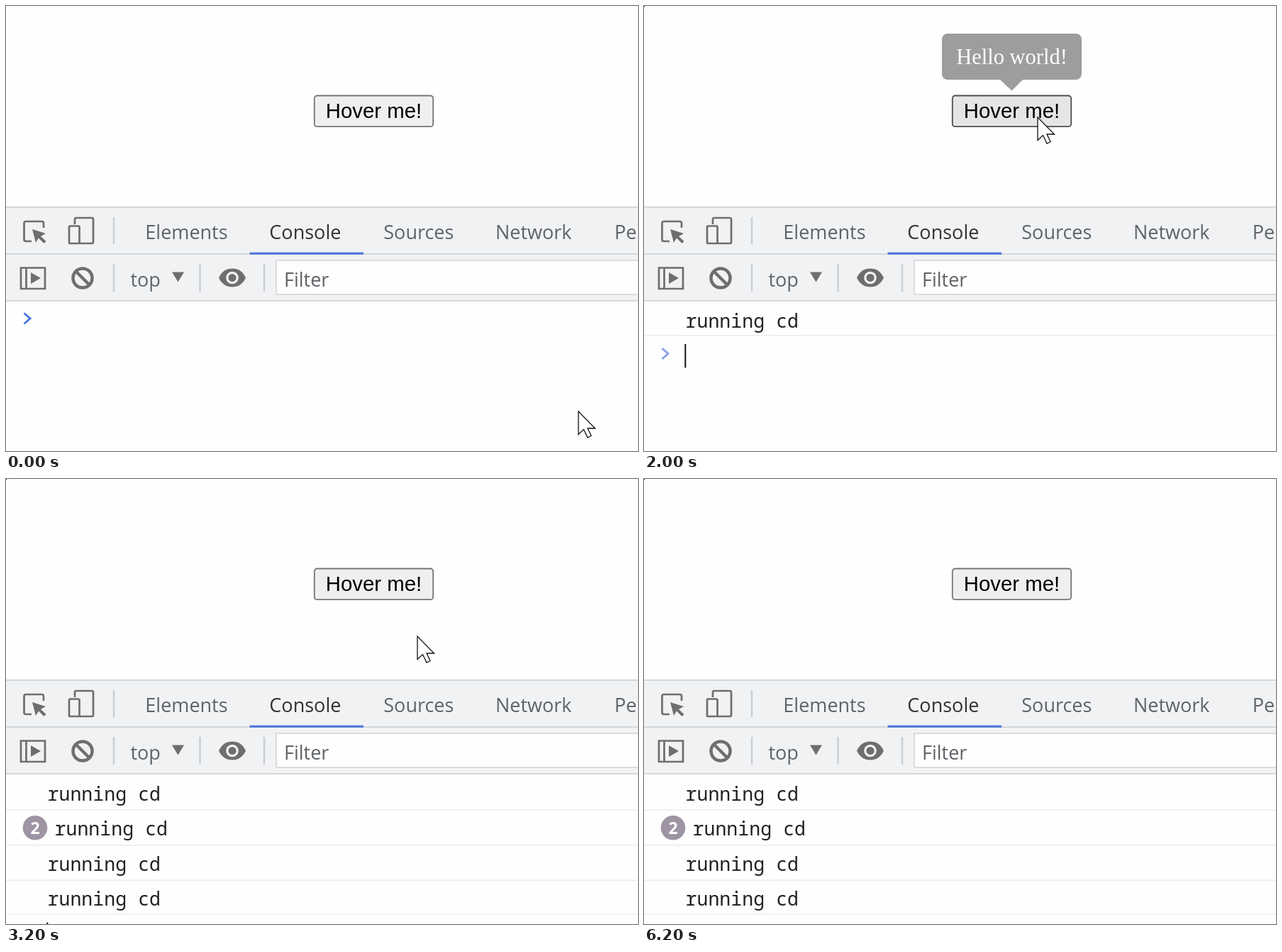
An HTML page for the animation above (6600 ms loop, 891x628 px).

```html
<!DOCTYPE html>
<html lang="en">
<head>
<meta charset="utf-8">
<title>Tooltip hover demo</title>
<style>
  html, body { margin: 0; width: 100%; height: 100%; overflow: hidden; background: #fefefe; }
  svg { display: block; }
  .ui { font: 27px "Open Sans", sans-serif; fill: #5f6368; }
  .active { fill: #333; }
  .mono { font: 26.6px "Noto Sans Mono", monospace; fill: #222; }
  .icon { fill: #6e6e6e; }
  .outline { fill: none; stroke: #6e6e6e; stroke-width: 2.7; }
  .bold { stroke-width: 4.5; }
  .divider { stroke: #caced2; stroke-width: 2.5; }
  .border { stroke: #cacdd1; stroke-width: 1.6; }
</style>
</head>
<body>
<svg width="891" height="628" viewBox="0 0 891 628">
  <rect width="891" height="628" fill="#fefefe"/>
  <rect id="dot" width="1" height="1"/>

  <rect id="button" x="434.8" y="126.5" width="167.4" height="43.7" rx="4" stroke-width="1.8"/>
  <text x="518.5" y="158.3" text-anchor="middle" font-family="Liberation Sans, Arial, sans-serif" font-size="29.33">Hover me!</text>

  <g id="tooltip">
    <path fill="#323234" d="M428 39H609a8 8 0 0 1 8 8V96a8 8 0 0 1-8 8H534L518.5 119.5 502 104H428a8 8 0 0 1-8-8V47a8 8 0 0 1 8-8Z"/>
    <text x="518.5" y="82" text-anchor="middle" font-family="Liberation Serif, Times, serif" font-size="30.5" fill="#fff">Hello world!</text>
  </g>

  <rect y="284" width="891" height="132" fill="#f1f2f4"/>
  <rect id="tabHover" x="503.500" y="286" width="157.5" height="63" fill="#dde1e5"/>
  <path class="border" d="M0 283.7H891M0 350H891M0 416H891"/>
  <rect x="343.5" y="347.6" width="160.5" height="3.200" fill="#5078dc"/>
  <rect x="381" y="359" width="520" height="48" fill="#fefefe" stroke="#dadce0" stroke-width="2"/>
  <path class="divider" d="M152 298V336M152 364V403M273.5 364V403M364 364V403"/>

  <g class="ui">
    <text x="196.3" y="328.5">Elements</text>
    <text x="371.3" y="328.5" class="active">Console</text>
    <text x="532.3" y="328.5" id="sources">Sources</text>
    <text x="690" y="328.5">Network</text>
    <text x="857.8" y="328.5">Performance</text>
    <text x="175.4" y="395.5">top</text>
    <text x="392" y="395.5">Filter</text>
  </g>

  <path class="outline" d="M36 332H28q-2.500 0-2.500-2.500V306.500q0-2.500 2.500-2.500H50.500q2.500 0 2.500 2.500V313"/>
  <path class="icon" d="M37 315L56 321 49 325 56.500 332 53.500 335 46 327.500 42 334Z"/>
  <path class="outline" d="M97 308V301q0-2 2-2H121q2 0 2 2V333q0 2-2 2H104"/>
  <rect class="outline" x="89" y="310.5" width="14.5" height="24.5" rx="1.5"/>
  <path class="outline" d="M21 369.500H55V399H21ZM28.500 369.500V399"/>
  <path class="icon" d="M35 376L49 384 35 392ZM234 375.500H251L242.500 389.500Z"/>
  <path class="outline bold" d="M94.500 384a13.500 13.500 0 1 0 27 0a13.500 13.500 0 1 0-27 0M99 375L117.500 393.500"/>
  <path class="icon" d="M300 383.500Q306 370.500 319 370.500T338 383.500Q332 396.500 319 396.500T300 383.500Z"/>
  <circle cx="319" cy="383.5" r="7.2" class="icon" stroke="#f1f2f4" stroke-width="3.2"/>

  <g id="rows"></g>
  <g id="prompt">
    <path id="chevron" d="M25.500 433.500L34 441 25.500 448.500" fill="none" stroke-width="3"/>
    <rect id="caret" x="57.3" y="427.4" width="2" height="33.5" fill="#111"/>
  </g>
  <path id="cursor" d="M0 0V32.500L7.500 25.500 13 37 18 34.500 13 24H23.500Z" fill="#fff" stroke="#111" stroke-width="1.3"/>
</svg>
<script>
const LOOP = 6600, STEP = 200, ROW = 49.6, BLINK = 510;
const el = id => document.getElementById(id);
const show = (id, on) => el(id).setAttribute('visibility', on ? 'visible' : 'hidden');
const set = (id, attrs) => { for (const k in attrs) el(id).setAttribute(k, attrs[k]); };

// time, x, y, easing power towards this point
const path = [
  [300, 807, 572, 1], [1400, 608, 308, 1.4], [1800, 555, 157, 1],
  [2400, 555, 157, 1], [2600, 553, 157, 1], [2800, 580, 222, 1]
];
// time each console row appears
const rowTimes = [2000, 2400, 2800, 3000];

function cursorAt(t) {
  const i = path.findIndex(p => t < p[0]);
  if (i === 0) return path[0].slice(1, 3);
  if (i < 0) return path[path.length - 1].slice(1, 3);
  const [t0, x0, y0] = path[i - 1], [t1, x1, y1, power] = path[i];
  const u = ((t - t0) / (t1 - t0)) ** power;
  return [x0 + (x1 - x0) * u, y0 + (y1 - y0) * u];
}

function tooltipOpacity(t) {
  if (t < 2600) return Math.min(1, Math.max(0, (t - 1906) / 200));
  return t < 2800 ? 1 : Math.max(0, 0.21 - (t - 2800) / 200);
}

function rowMarkup(i, count, grouped) {
  const y = ROW * i, line = y + 416 + ROW + (i < count - 1 ? 1.6 : -0.4);
  const badge = grouped ? `<circle cx="41" cy="${y + 442.6}" r="17.3" fill="#9e94a3"/>
    <text x="41" y="${y + 451}" text-anchor="middle" font-family="Open Sans, sans-serif" font-weight="700" font-size="23" fill="#fff">2</text>` : '';
  return `${badge}<text class="mono" x="${grouped ? 68.5 : 58.5}" y="${y + 453.6}">running cd</text>
    <path d="M0 ${line}H891" stroke="#ececee" stroke-width="1.6"/>`;
}

let shownRows = -1;
function drawRows(count) {
  if (count === shownRows) return;
  shownRows = count;
  el('rows').innerHTML = rowTimes.slice(0, count)
    .map((_, i) => rowMarkup(i, count, i === 1 && count > 2)).join('');
}

function draw(now) {
  const t = Math.floor(now % LOOP / STEP) * STEP;
  const [x, y] = cursorAt(t);
  const overButton = x > 434 && x < 603 && y > 126 && y < 171;
  const overTab = x > 504 && x < 661 && y > 286 && y < 350;
  const count = rowTimes.filter(r => t >= r).length;
  const pointerInside = t < 6000;

  show('dot', t > 0);
  show('cursor', pointerInside);
  set('cursor', { transform: `translate(${x} ${y})` });
  set('button', overButton ? { fill: '#e5e5e5', stroke: '#4f4f4f' } : { fill: '#efefef', stroke: '#767676' });
  set('tooltip', { opacity: tooltipOpacity(t) });
  show('tabHover', overTab);
  set('sources', { class: overTab ? 'active' : '' });
  drawRows(count);
  set('prompt', { transform: `translate(0 ${ROW * count})` });
  set('chevron', { stroke: t > 0 ? '#8fa6ea' : '#4b77e0' });
  show('caret', pointerInside && t >= 2000 && Math.floor((t - 2000) / BLINK) % 2 === 0);
  requestAnimationFrame(draw);
}
requestAnimationFrame(draw);
</script>
</body>
</html>
```
